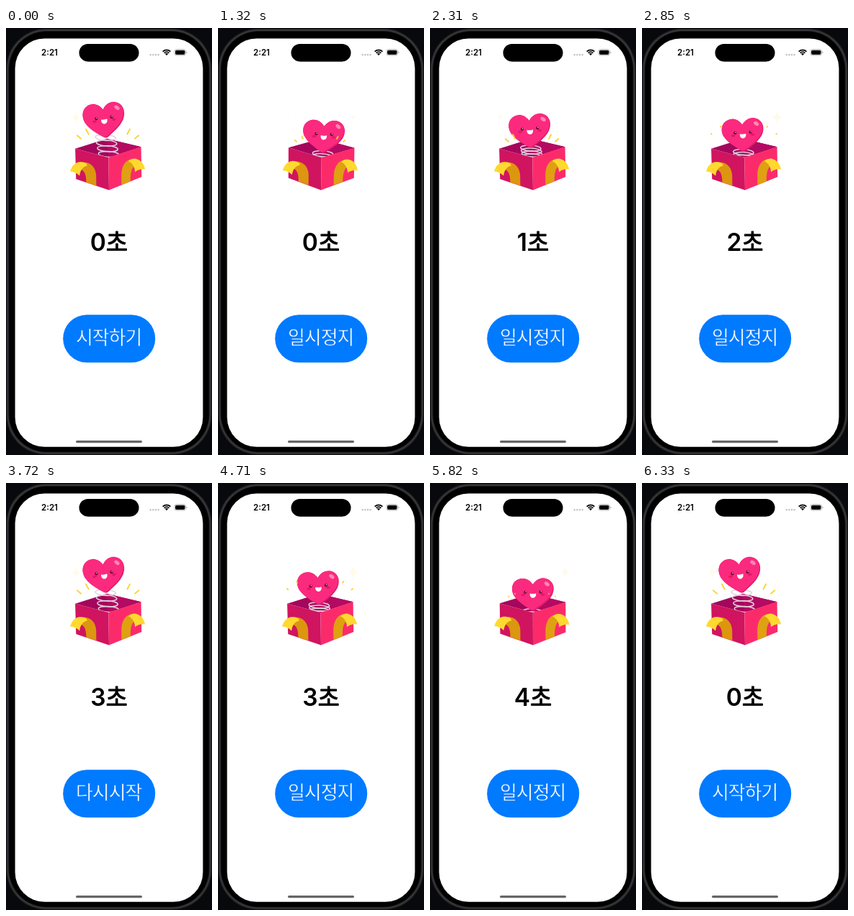
Write an HTML page with a canvas that moves like this. It is 286 px wide and 590 px high and loops after 6570 ms.

```html
<!DOCTYPE html>
<html lang="ko">
<head>
<meta charset="utf-8">
<title>Timer</title>
<style>
html, body { margin: 0; width: 100%; height: 100%; overflow: hidden; background: #08090c; }
canvas { display: block; width: 286px; height: 590px; }
</style>
</head>
<body>
<canvas id="stage"></canvas>
<script>
const W = 286, H = 590, LOOP = 6570, BEAT = 900;
const RUNS = [[750, 3720], [4440, 6330]];
const TICKS = [1710, 2700, 3690, 5400];
const KOREAN = "'Noto Sans CJK KR', 'Noto Sans CJK', sans-serif";
const LATIN = 'Inter, sans-serif';
const BLUE = '#007aff';
const TAU = Math.PI * 2;

const canvas = document.getElementById('stage');
const ctx = canvas.getContext('2d');
const dpr = window.devicePixelRatio || 1;
canvas.width = W * dpr;
canvas.height = H * dpr;

const clamp = (v, a, b) => Math.max(a, Math.min(b, v));
const mix = (a, b, k) => a + (b - a) * k;

function rrect(x, y, w, h, r, fill) {
  ctx.beginPath();
  ctx.roundRect(x, y, w, h, r);
  ctx.fillStyle = fill;
  ctx.fill();
}

function shape(d, fill) {
  ctx.fillStyle = fill;
  ctx.fill(new Path2D(d));
}

function oval(x, y, rx, ry, fill, turn = 0) {
  ctx.beginPath();
  ctx.ellipse(x, y, rx, ry, turn, 0, TAU);
  ctx.fillStyle = fill;
  ctx.fill();
}

// An edge in the text colour thickens the letters, one in the ground colour thins them.
function text(str, x, y, font, fill, edge, edgeWidth) {
  ctx.font = font;
  ctx.fillStyle = fill;
  ctx.fillText(str, x, y);
  if (!edge) return;
  ctx.strokeStyle = edge;
  ctx.lineWidth = edgeWidth;
  ctx.lineJoin = 'round';
  ctx.strokeText(str, x, y);
}

function phone() {
  ctx.fillStyle = '#08090c';
  ctx.fillRect(0, 0, W, H);
  rrect(0.5, 1, 285, 588.5, 55, '#232325');
  rrect(1.8, 2.3, 282.4, 585.9, 54, '#39393b');
  rrect(3.4, 3.9, 279.2, 582.7, 53, '#141416');
  rrect(4.6, 5.1, 276.8, 580.3, 52, '#000');
  rrect(12.6, 14.4, 260.8, 564.4, 41, '#fff');
  rrect(101.5, 22, 83, 24.4, 12.2, '#000');
  rrect(97, 570, 92, 3.2, 1.6, '#666');
}

function statusBar() {
  ctx.textAlign = 'center';
  text('2:21', 60.5, 38, '600 11.5px ' + LATIN, '#000');
  for (let i = 0; i < 4; i++) oval(200.7 + i * 3.6, 37, 1.3, 1.3, '#c4c4c6');

  ctx.strokeStyle = '#000';
  ctx.lineWidth = 1.7;
  ctx.lineCap = 'butt';
  for (const r of [7.6, 4.8]) {
    ctx.beginPath();
    ctx.arc(223, 38, r, -Math.PI * 0.75, -Math.PI * 0.25);
    ctx.stroke();
  }
  shape('M223 38 L220.8 35.6 Q223 33.9 225.2 35.6 Z', '#000');

  ctx.beginPath();
  ctx.roundRect(233.9, 29.6, 15.6, 8.2, 2.6);
  ctx.strokeStyle = '#a8a8a8';
  ctx.lineWidth = 0.8;
  ctx.stroke();
  rrect(235, 30.7, 13.4, 6, 1.6, '#000');
  rrect(250.4, 32.4, 1, 2.7, 0.5, '#a8a8a8');
}

function star(x, y, k) {
  if (k <= 0) return;
  const a = 7 * k, b = 11 * k;
  shape(`M${x} ${y - b} Q${x + 1} ${y - 1} ${x + a} ${y} Q${x + 1} ${y + 1} ${x} ${y + b}
    Q${x - 1} ${y + 1} ${x - a} ${y} Q${x - 1} ${y - 1} ${x} ${y - b}Z`, '#fffbe9');
}

function sparkles(t) {
  const size = lag => 0.4 + 0.6 * Math.cos(TAU * (t - lag) / BEAT);
  star(97.5, 123.5, size(-60) * 0.85);
  star(187.6, 123.5, size(330));
}

function rays(t) {
  const p = ((t + 420) % BEAT) / BEAT;
  const head = clamp(p / 0.6, 0, 1), tail = clamp((p - 0.25) / 0.58, 0, 1);
  if (head <= tail) return;
  ctx.strokeStyle = '#fbd334';
  ctx.lineWidth = 1.9;
  ctx.lineCap = 'round';
  for (const [x0, y0, x1, y1] of [[109, 157, 96, 146], [118, 153, 109, 136]]) {
    for (const flip of [false, true]) {
      const at = k => [flip ? 283 - mix(x0, x1, k) : mix(x0, x1, k), mix(y0, y1, k)];
      ctx.beginPath();
      ctx.moveTo(...at(tail));
      ctx.lineTo(...at(head));
      ctx.stroke();
    }
  }
}

function withBoxTilt(lean, draw) {
  ctx.save();
  ctx.translate(143, 224);
  ctx.rotate(lean * 0.0157);
  ctx.translate(-143, -224);
  draw();
  ctx.restore();
}

function boxTop() {
  shape('M97 166 L141 153 L188.5 165 L143 179Z', '#a4075c');
  shape('M141 153 L188.5 165 L143 179Z', '#b40a62');
}

function boxFront() {
  shape('M97 166 L143 179 L143 224 L97.5 208Z', '#d0145f');
  shape('M143 179 L188.5 165 L188.5 206.5 L143 224Z', '#fb2b6b');

  shape('M101 186 C115 182 125 190 125.5 203 L125.5 217.6 L111.5 212.7 C112 202 109 194 101 195Z', '#dc960f');
  shape('M89.5 197.5 C92 188 99 182.5 108 185 C112 186 113.5 188 113 190 C107 191 103.5 196 102.5 203.5 Q97 198 89.5 197.5Z', '#ffd92f');
  shape('M160.5 217 L160.5 203 C161 190 168 179.5 180 182 L183 190 C176 190 173 198 173 212.4Z', '#dfa012');
  shape('M170.5 184.5 C174 181 178 180.3 182 181.5 C189 183.5 192.5 190 193.5 196 Q185 195 179.5 199.5 C179.5 193 176 187 170.5 184.5Z', '#ffd92f');
}

// Coils hang from the heart; once squeezed, the lower ones sink into the box.
function spring(hx, hy) {
  const top = hy + 23.5, pitch = Math.max(4, (174.5 - top) / 3);
  ctx.lineWidth = 1.5;
  ctx.strokeStyle = '#e3d3de';
  for (let i = 0; i < 4; i++) {
    const x = mix(mix(142.5, hx, 0.7), 142.5, i / 3);
    ctx.beginPath();
    ctx.ellipse(x, top + i * pitch, 14.2, 4, 0.06, 0, TAU);
    ctx.stroke();
  }
}

const HEART = 'M0 -16 C-5 -24 -12 -26.5 -18 -25 C-30 -22 -32.5 -9 -27 1.5 C-21 12 -10 18.5 -3 24 Q0 26 3 24 C10 18.5 21 12 27 1.5 C32.5 -9 30 -22 18 -25 C12 -26.5 5 -24 0 -16Z';

function heart(x, y, turn, squash) {
  ctx.save();
  ctx.translate(x, y);
  ctx.rotate(turn);
  ctx.scale(0.97, mix(0.96, 0.89, squash));
  shape(HEART, '#e01d68');
  ctx.save();
  ctx.clip(new Path2D(HEART));
  ctx.translate(-1.2, -1.5);
  shape(HEART, '#fb2a7e');
  ctx.restore();

  oval(20, -16.5, 4.2, 2.7, '#ff86b4', 0.75);
  for (const side of [-1, 1]) {
    oval(side * 14, 0, 3, 1.8, '#e51767');
    oval(side * 11, -4, 2.3, 2.4, '#7b0d3c');
    oval(side * 11 + 0.7, -4.9, 0.7, 0.7, '#fff');
  }
  shape('M-4.3 -2 Q0 -0.8 4.3 -2 C4.8 2 3 4.8 0 4.8 C-3 4.8 -4.8 2 -4.3 -2Z', '#fff');
  ctx.restore();
}

function gift(t) {
  const sway = -Math.cos(Math.PI * t / BEAT);
  const bob = -Math.cos(TAU * t / BEAT);
  const x = 143.8 + 7.4 * sway, y = 141.3 + 13.4 * bob;
  const lean = clamp(sway * 2.5, -1, 1);
  sparkles(t);
  withBoxTilt(lean, boxTop);
  spring(x, y);
  withBoxTilt(lean, boxFront);
  heart(x, y, sway * 0.11, (bob + 1) / 2);
  rays(t);
}

function counter(n) {
  const digitFont = '600 33.5px ' + LATIN, unitFont = '400 33px ' + KOREAN;
  ctx.font = digitFont;
  const digitWidth = ctx.measureText(n).width;
  ctx.font = unitFont;
  const left = 143 - (digitWidth + ctx.measureText('초').width) / 2;
  ctx.textAlign = 'left';
  text(n, left, 308, digitFont, '#000');
  text('초', left + digitWidth, 307.5, unitFont, '#000', '#000', 0.9);
}

function button(action) {
  rrect(79.2, 396.2, 128, 66, 33, BLUE);
  ctx.textAlign = 'center';
  ctx.letterSpacing = '-0.9px';
  text(action, 142.7, 436.9, '300 25.8px ' + KOREAN, '#fff', BLUE, 0.4);
  ctx.letterSpacing = '0px';
}

function frame(now) {
  const t = now % LOOP;
  const run = RUNS.find(([a, b]) => t >= a && t < b);
  const reset = t < RUNS[0][0] || t >= RUNS[1][1];
  const count = reset ? 0 : TICKS.filter(k => t >= k).length;

  ctx.setTransform(dpr, 0, 0, dpr, 0, 0);
  phone();
  statusBar();
  gift(run ? t - run[0] : 0);
  counter(String(count));
  button(run ? '일시정지' : reset ? '시작하기' : '다시시작');
}

const start = performance.now();
function loop() {
  frame(performance.now() - start);
  requestAnimationFrame(loop);
}
loop();
</script>
</body>
</html>
```
